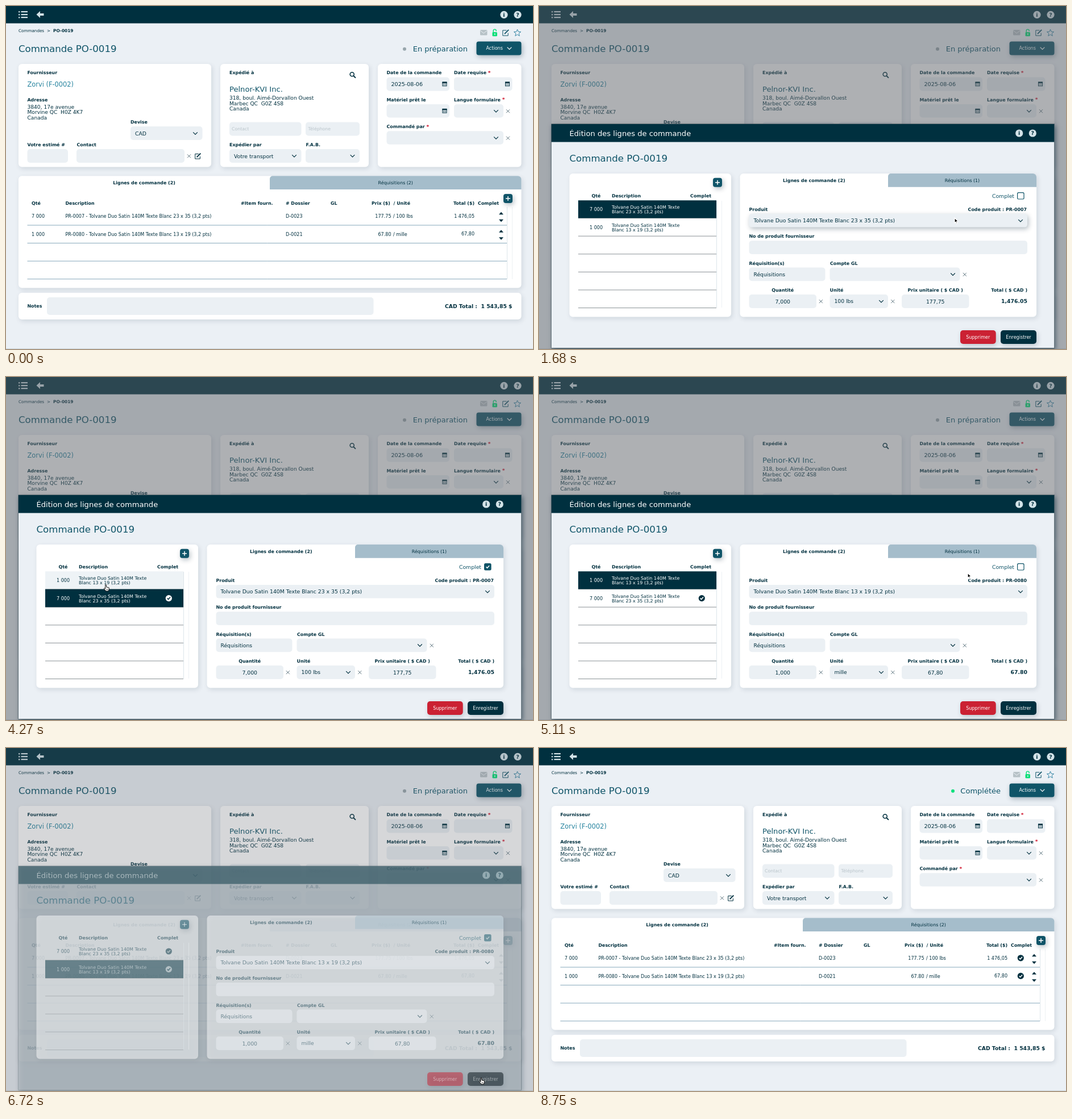
An HTML page with a canvas that plays this animation: 927 px wide and 604 px high, repeating every 9.03 s.

```html
<!DOCTYPE html>
<html lang="fr">
<head>
<meta charset="utf-8">
<title>Commande PO-0019</title>
<style>
  html, body { margin: 0; width: 100%; height: 100%; overflow: hidden; background: #ebf0f5; }
  canvas { display: block; width: 927px; height: 604px; }
</style>
</head>
<body>
<canvas id="stage"></canvas>
<script>
const W = 927, H = 604, LOOP = 9030, STEP = 70;
const INK = '#00303f', TEAL = '#0f5468', FIELD = '#ebf0f4', BG = '#ebf0f5',
      TAB = '#a5bdcb', PALE = '#d3e3e8', LINE = '#86a8bb';
const canvas = document.getElementById('stage');
const ctx = canvas.getContext('2d');
const dpr = window.devicePixelRatio || 1;
canvas.width = W * dpr;
canvas.height = H * dpr;

const PAPER = 'Tolvane Duo Satin 140M Texte';
const items = {
  a: { qty: '7 000', size: 'Blanc 23 x 35 (3,2 pts)', code: 'PR-0007', count: '7,000', unit: '100 lbs',
       price: '177,75', total: '1,476.05', rate: '177.75', sum: '1 476,05', file: 'D-0023' },
  b: { qty: '1 000', size: 'Blanc 13 x 19 (3,2 pts)', code: 'PR-0080', count: '1,000', unit: 'mille',
       price: '67,80', total: '67.80', rate: '67.80', sum: '67,80', file: 'D-0021' }
};

// Pointer path: time, x, y
const path = [
  [420, 518, 549], [490, 645, 452], [560, 731, 373], [1190, 731, 373], [1260, 735, 377], [1400, 731, 373],
  [2100, 731, 373], [2170, 765, 361], [2310, 832, 343], [2450, 834, 342], [2800, 843, 335],
  [3500, 843, 335], [3570, 746, 354], [3710, 450, 379], [3920, 215, 376], [4410, 160, 362],
  [4830, 160, 362], [4970, 430, 358], [5110, 754, 345], [5250, 838, 337], [5530, 843, 335],
  [5950, 843, 335], [6160, 837, 556], [6440, 836, 581], [6930, 836, 581],
  [7000, 835, 565], [7210, 806, 270], [7420, 778, 68], [7910, 778, 68], [8330, 725, 300], [8750, 640, 604]
];

const ramp = (t, a, b) => Math.min(1, Math.max(0, (t - a) / (b - a)));

function pointer(t) {
  if (t < path[0][0] || t >= path[path.length - 1][0]) return null;
  const i = path.findIndex(k => k[0] > t);
  const [t0, x0, y0] = path[i - 1], [t1, x1, y1] = path[i];
  const k = (t - t0) / (t1 - t0);
  return [x0 + (x1 - x0) * k, y0 + (y1 - y0) * k];
}

function text(s, x, y, size = 8.05, color = INK, align = 'left', weight = '') {
  ctx.font = `${weight} ${size}px "DejaVu Sans", Verdana, sans-serif`;
  ctx.textAlign = align;
  ctx.fillStyle = color;
  ctx.fillText(s, x, y + size * 0.365);
}
const bold = (s, x, y, align = 'left', size = 7.9, color = INK) => text(s, x, y, size, color, align, 'bold');

function box(x, y, w, h, fill, r = 0, shadow) {
  ctx.save();
  if (shadow) {
    ctx.shadowColor = `rgba(0,35,55,${shadow})`;
    ctx.shadowBlur = 8 * dpr;
    ctx.shadowOffsetX = 2 * dpr;
    ctx.shadowOffsetY = 3 * dpr;
  }
  ctx.fillStyle = fill;
  ctx.beginPath();
  ctx.roundRect(x, y, w, h, r);
  ctx.fill();
  ctx.restore();
}
const card = (x, y, w, h) => box(x, y, w, h, '#fff', 6, 0.12);
const field = (x, y, w, h = 24) => box(x, y, w, h, FIELD, 5);

function poly(x, y, pts, { fill, stroke, width = 1, close = !!fill } = {}) {
  ctx.beginPath();
  for (let i = 0; i < pts.length; i += 2) ctx.lineTo(x + pts[i], y + pts[i + 1]);
  if (close) ctx.closePath();
  if (fill) { ctx.fillStyle = fill; ctx.fill(); }
  if (stroke) { ctx.strokeStyle = stroke; ctx.lineWidth = width; ctx.stroke(); }
}
const rule = (x, y, dx, dy, stroke, width = 1) => poly(x, y, [0, 0, dx, dy], { stroke, width });

function disc(x, y, r, fill) {
  ctx.beginPath();
  ctx.arc(x, y, r, 0, 7);
  ctx.fillStyle = fill;
  ctx.fill();
}

const chevron = (x, y, color = INK) => poly(x, y, [-3.8, -1.9, 0, 1.9, 3.8, -1.9], { stroke: color, width: 1.2 });

function cross(x, y) {
  rule(x - 3, y - 3, 6, 6, '#4b6570', 0.9);
  rule(x - 3, y + 3, 6, -6, '#4b6570', 0.9);
}

function badge(x, y, char) {
  disc(x, y, 6.6, PALE);
  bold(char, x, y, 'center', 9.5);
}

function tick(x, y, r, fill, mark) {
  if (r) disc(x, y, r, fill);
  poly(x, y, [-2.7, 0, -0.8, 2, 2.8, -2], { stroke: mark, width: 1.5 });
}

function calendar(x, y) {
  ctx.strokeStyle = INK;
  ctx.lineWidth = 0.9;
  ctx.strokeRect(x - 3.6, y - 3.2, 7.2, 6.8);
  box(x - 4, y - 3.8, 8, 2.6, INK);
  for (let i = 0; i < 6; i++) box(x - 2.5 + (i % 3) * 2, y + (i > 2 ? 1.5 : -0.2), 1, 1, INK);
}

function pencil(x, y, s, color) {
  poly(x, y, [s * 0.3, -s * 0.8, -s, -s * 0.8, -s, s, s * 0.8, s, s * 0.8, s * 0.1], { stroke: color, width: 1 });
  rule(x - s * 0.4, y + s * 0.4, s * 1.4, -s * 1.4, color, 1.8);
}

function plus(x, y) {
  box(x - 8, y - 8, 16, 16, TEAL, 4, 0.3);
  rule(x - 4, y, 8, 0, '#fff', 1.5);
  rule(x, y - 4, 0, 8, '#fff', 1.5);
}

function topIcons() {
  for (let i = 0; i < 3; i++) {
    box(22, 9 + i * 5, 2.4, 2.4, PALE, 1);
    box(26.5, 9 + i * 5, 11.5, 2.2, PALE);
  }
  poly(53.5, 15, [0, 0, 6.5, -6, 6.5, -2, 13, -2, 13, 2, 6.5, 2, 6.5, 6], { fill: PALE });
  badge(876, 15.3, 'i');
  badge(900, 15.3, '?');

  box(834, 42, 12.5, 9.5, '#b7c2c7', 1.5);
  poly(834, 42, [0.5, 1.5, 6.2, 6, 12, 1.5], { stroke: BG });
  box(855.5, 46, 8.5, 7.3, '#08df78', 1.5);
  ctx.beginPath();
  ctx.arc(859.7, 43.6, 2.5, Math.PI, 0);
  ctx.lineTo(862.2, 44.5);
  ctx.moveTo(857.2, 43.6);
  ctx.lineTo(857.2, 47);
  ctx.strokeStyle = '#08df78';
  ctx.lineWidth = 1.4;
  ctx.stroke();
  box(859.1, 48, 1.4, 3, BG);
  pencil(879, 47, 5.2, TEAL);
  const star = [];
  for (let i = 0; i < 10; i++) {
    const r = i % 2 ? 2.8 : 6.4, a = i * Math.PI / 5;
    star.push(Math.sin(a) * r, -Math.cos(a) * r);
  }
  poly(899.5, 47.5, star, { stroke: '#3687a6', close: true });
}

function supplier() {
  card(22, 102, 339, 181.5);
  bold('Fournisseur', 37.5, 117.5);
  text('Zorvi (F-0002)', 37.5, 138, 11.4, '#27849f');
  bold('Adresse', 37.5, 165);
  ['3840, 17e avenue', 'Morvine QC  H0Z 4K7', 'Canada'].forEach((s, i) => text(s, 37.5, 177.8 + i * 9.3, 9.1));
  bold('Devise', 219, 204.5);
  field(219, 212, 126.5);
  text('CAD', 227, 224.3, 9.3);
  chevron(333, 224.3);
  bold('Votre estimé #', 37.5, 244);
  field(37.5, 252, 71.5);
  bold('Contact', 124.5, 244);
  field(124, 252, 190);
  cross(322, 264.3);
  pencil(337.5, 264.3, 4.8, INK);
}

function shipping() {
  card(377, 102, 261, 181.5);
  bold('Expédié à', 393, 117.5);
  ctx.beginPath();
  ctx.arc(608.7, 120.3, 3.5, 0, 7);
  ctx.strokeStyle = INK;
  ctx.lineWidth = 1.6;
  ctx.stroke();
  rule(611.3, 123, 3.7, 3.6, INK, 2);
  text('Pelnor-KVI Inc.', 393, 146, 13.1, TEAL);
  ['318, boul. Aimé-Dorvallon Ouest', 'Marbec QC  G0Z 4S8', 'Canada'].forEach((s, i) => text(s, 393, 162 + i * 9.3, 9.1));
  field(393, 204.5, 126.5);
  field(527, 204.5, 95);
  text('Contact', 397, 216.5, 7.8, '#b9c4ca');
  text('Téléphone', 531.5, 216.5, 7.8, '#b9c4ca');
  bold('Expédier par', 393, 244);
  field(393, 252, 126.5);
  text('Votre transport', 401, 264.3, 9.2);
  chevron(507, 264);
  bold('F.A.B.', 527.5, 244);
  field(527, 252, 95);
  chevron(609.5, 264);
}

function required(s, x, y) {
  bold(s, x, y);
  const w = ctx.measureText(s + ' ').width;
  bold('*', x + w, y, 'left', 9, '#d0142c');
}

function dates() {
  card(654, 102, 252.5, 181.5);
  bold('Date de la commande', 669.5, 117.5);
  required('Date requise', 788, 117.5);
  field(669.5, 125.5, 110.5);
  text('2025-08-06', 677.5, 138, 9.55);
  field(788, 125.5, 102.5);
  calendar(771.5, 137.3);
  calendar(882, 137.3);
  bold('Matériel prêt le', 669.5, 165);
  field(669.5, 173, 110.5, 23.5);
  calendar(771.5, 184.6);
  required('Langue formulaire', 788, 165);
  field(788, 173, 87, 23.5);
  chevron(862, 185);
  cross(883, 185.2);
  required('Commandé par', 669.5, 212.3);
  field(669.5, 220.3, 205.5, 23.5);
  chevron(862, 232.3);
  cross(883, 232.6);
}

function tabs(x, y, w, h, split, right, tint) {
  card(x, y, w, h);
  box(split, y, x + w - split, 23.8, tint, [5, 6, 0, 0]);
  bold('Lignes de commande (2)', (x + split) / 2, y + 11.8, 'center');
  text(right, (x + w + split) / 2, y + 11.8, 7.9, INK, 'center');
}

function table(t, done) {
  tabs(22, 299.3, 884.5, 197.2, 464, 'Réquisitions (2)', t >= 8330 && t < 8400 ? '#91aebf' : TAB);
  const glow = t < 1680 ? ramp(t, 630, 1120) : 0;
  if (glow) box(37.5, 354.5, 843.5, 31, `rgba(222,232,238,${glow * 0.7})`);
  [['Qté', 45], ['Description', 104.5], ['#Item fourn.', 413], ['# Dossier', 492], ['GL', 571],
   ['Prix ($)', 643], ['/ Unité', 681.5]].forEach(([s, x]) => bold(s, x, 346.8));
  bold('Total ($)', 824, 346.8, 'right');
  bold('Complet', 867, 346.8, 'right');
  [items.a, items.b].forEach((it, i) => {
    const y = 370.2 + i * 31.6;
    text(it.qty, 45, y);
    text(`${it.code} - ${PAPER} ${it.size}`, 104.5, y);
    text(it.file, 492, y);
    text(it.rate, 677.5, y, 8.05, INK, 'right');
    text('/ ' + it.unit, 681, y);
    text(it.sum, 824, y - 0.6, 8.05, INK, 'right');
    poly(871, y - 5, [-4, 2, 0, -2.5, 4, 2], { fill: INK });
    poly(871, y + 7.5, [-4, -2, 0, 2.5, 4, -2], { fill: INK });
    if (done) tick(847.3, y - 0.4, 5.6, INK, '#fff');
  });
  for (let i = 0; i < 4; i++) rule(37.5, 386 + i * 31.6, 843.5, 0, LINE);
  rule(881.5, 354, 0, 127, '#dde5ea');
  rule(890.5, 354, 0, 127, '#edf1f4');
  plus(883, 339);
}

function page(t) {
  const done = t >= 6790;
  box(0, 0, W, H, BG);
  box(0, 603, W, 1, '#cbd5db');
  box(0, 0, W, 30.6, INK);
  topIcons();
  text('Commandes', 22, 43.7, 7.2);
  text('>', 72, 43.7, 7.2);
  bold('PO-0019', 83, 43.7, 'left', 7.4);
  text('Commande PO-0019', 22, 75.2, 16.6, TEAL);
  text(done ? 'Complétée' : 'En préparation', 812, 75.2, 13, TEAL, 'right');
  disc(done ? 728 : 701, 75.7, 3, done ? '#0be07d' : '#98a6ac');
  box(827.5, 62.5, 79, 24, TEAL, 4, 0.3);
  text('Actions', 844.5, 74.3, 8.05, '#fff');
  chevron(885.5, 74.5, '#fff');
  supplier();
  shipping();
  dates();
  table(t, done);
  card(22, 505, 884.5, 47);
  bold('Notes', 37.5, 528.3);
  field(72, 513, 574.5, 31);
  bold('CAD Total :  1 543,85 $', 890.5, 528.3, 'right', 9.25);
}

// Line editor state
function editor(t) {
  if (t < 3220) return { rows: 'ab', sel: 0, marks: '', on: t >= 3080 };
  if (t < 5880) return { rows: 'ba', sel: t < 4480 ? 1 : 0, marks: 'a', on: t < 4480 || t >= 5740 };
  return { rows: 'ab', sel: 1, marks: 'ab', on: true };
}

function lineList(t, { rows, sel, marks }) {
  card(53.5, 295, 284.5, 252.5);
  plus(314, 310.8);
  bold('Qté', 100.5, 334.2, 'center');
  bold('Description', 128, 334.2);
  bold('Complet', 303, 334.2, 'right');
  for (let i = 1; i < 7; i++) rule(69, 342 + i * 31.6, 243, 0, '#8b9296');
  if (sel === 1 && t >= 3920 && t < 4480) box(69, 342.3, 243, 31, `rgba(222,232,238,${0.7 * ramp(t, 3850, 4410)})`);
  [...rows].forEach((key, i) => {
    const y = 358 + i * 31.6, active = i === sel, color = active ? '#fff' : INK, it = items[key];
    if (active) box(69, y - 15.8, 243, 31.4, INK);
    text(it.qty, 112, y, 8.05, color, 'right');
    text(PAPER, 128, y - 4, 7.95, color);
    text(it.size, 128, y + 4, 7.95, color);
    if (marks.includes(key)) tick(286.3, y, 5.6, color, active ? INK : '#fff');
  });
  rule(312.5, 343, 0, 188, '#dde5ea');
  rule(321.5, 343, 0, 188, '#edf1f4');
}

function checkbox(t, on) {
  const since = t >= 5740 ? t - 5740 : t - 3080;
  if (since >= 0 && since < 210) disc(847.3, 334.3, 18, `rgba(15,84,104,${0.1 * (1 - since / 210)})`);
  box(841, 328, 12.6, 12.6, TEAL, 2.5);
  if (on) tick(847.3, 334.3, 0, '', '#fff');
  else box(842.2, 329.2, 10.2, 10.2, '#fff', 1.5);
}

function lineForm(t, state) {
  const it = items[state.rows[state.sel]];
  tabs(353.5, 295, 521.5, 252.5, 614, 'Réquisitions (1)', TAB);
  text('Complet', 836, 334.3, 9.3, TEAL, 'right');
  checkbox(t, state.on);
  bold('Produit', 369.5, 357.8);
  bold('Code produit : ' + it.code, 858, 357.8, 'right');
  box(369.5, 366, 489.5, 23.6, FIELD, 5, 0.3 * (1 - ramp(t, 2100, 2310)));
  text(`${PAPER} ${it.size}`, 377.5, 378, 9.3);
  chevron(847, 378);
  bold('No de produit fournisseur', 369.5, 405.3);
  field(369.5, 413.3, 489.5, 23.6);
  bold('Réquisition(s)', 369.5, 452.7);
  field(369.5, 460.6, 134, 23.6);
  text('Réquisitions', 377.5, 472.6, 9.2);
  bold('Compte GL', 512, 452.7);
  field(511.5, 460.6, 229, 23.6);
  chevron(728, 472.4);
  cross(748.8, 472.8);
  bold('Quantité', 428.7, 500, 'center');
  field(369.5, 508, 118.5);
  text(it.count, 428.7, 520.2, 9.3, INK, 'center');
  cross(495.8, 520.2);
  bold('Unité', 511.5, 500);
  field(511.5, 508, 102.5);
  text(it.unit, 519.5, 520, 9.2);
  chevron(602, 520);
  cross(622.3, 520.2);
  bold('Prix unitaire ( $ CAD )', 697.2, 500, 'center');
  field(638, 508, 118.5);
  text(it.price, 697.2, 520.2, 9.3, INK, 'center');
  bold('Total ( $ CAD )', 859, 500, 'right');
  bold(it.total, 859, 520, 'right', 9.3);
}

function dialog(t) {
  const state = editor(t);
  box(0, 0, W, H, 'rgba(90,95,100,.49)');
  box(21.5, 207.5, 885.5, 395, '#33444c', 0, 0.5);
  box(22, 208, 884.3, 394, BG);
  box(22, 208, 884.3, 31.5, INK);
  text('Édition des lignes de commande', 53.5, 224.2, 13.1, '#fff');
  badge(844.7, 224, 'i');
  badge(868.3, 224, '?');
  text('Commande PO-0019', 53.5, 268, 16.6, TEAL);
  lineList(t, state);
  lineForm(t, state);
  box(741, 571, 62.7, 24, '#cb2133', 5, 0.2);
  text('Supprimer', 772.3, 583, 8.05, '#fff', 'center');
  box(812, 571, 63, 24, t >= 6300 ? '#000c12' : INK, 5, 0.2);
  text('Enregistrer', 843.5, 583, 8.05, '#fff', 'center');
}

function drawPointer(t, open) {
  const p = pointer(t);
  if (!p) return;
  const [x, y] = p;
  const hot = open
    ? [[69, 342, 243, 63], [839, 326, 18, 18], [812, 571, 63, 24]]
    : [[38, 354, 843, 31], [464, 299, 442, 24]];
  const hand = hot.some(([l, u, w, h]) => x >= l && x < l + w && y >= u && y < u + h);
  ctx.lineJoin = 'round';
  if (hand) {
    poly(x, y, [-1, 0, 0.6, 0, 1, 4, 5.5, 5, 5.5, 8, 4.3, 11, 0, 11, -3.5, 6.5, -2.6, 5.5, -1, 7],
      { fill: '#fff', stroke: '#000', width: 0.9 });
    rule(x + 1.2, y + 7, 0, 2.5, '#000', 0.6);
    rule(x + 3, y + 7, 0, 2.5, '#000', 0.6);
  } else {
    poly(x, y, [0, 0, 0, 9, 2, 7.2, 3.4, 10.4, 4.9, 9.8, 3.5, 6.6, 6.2, 6.4], { stroke: '#fff', width: 1.3, close: true, fill: '#000' });
  }
  ctx.lineJoin = 'miter';
}

// Blends the open dialog over the page for one step
function layered(t, alpha) {
  ctx.globalAlpha = alpha;
  dialog(t);
  ctx.globalAlpha = 1;
}

function draw(t) {
  ctx.setTransform(dpr, 0, 0, dpr, 0, 0);
  page(t);
  const open = t >= 1610 && t < 6790;
  if (open) layered(t, t < 1680 || t >= 6720 ? 0.5 : 1);
  drawPointer(t, open);
}

const start = performance.now();
let last = -1;
function tickFrame() {
  const t = Math.floor(((performance.now() - start) % LOOP) / STEP) * STEP;
  if (t !== last) draw(last = t);
  requestAnimationFrame(tickFrame);
}
tickFrame();
</script>
</body>
</html>
```
